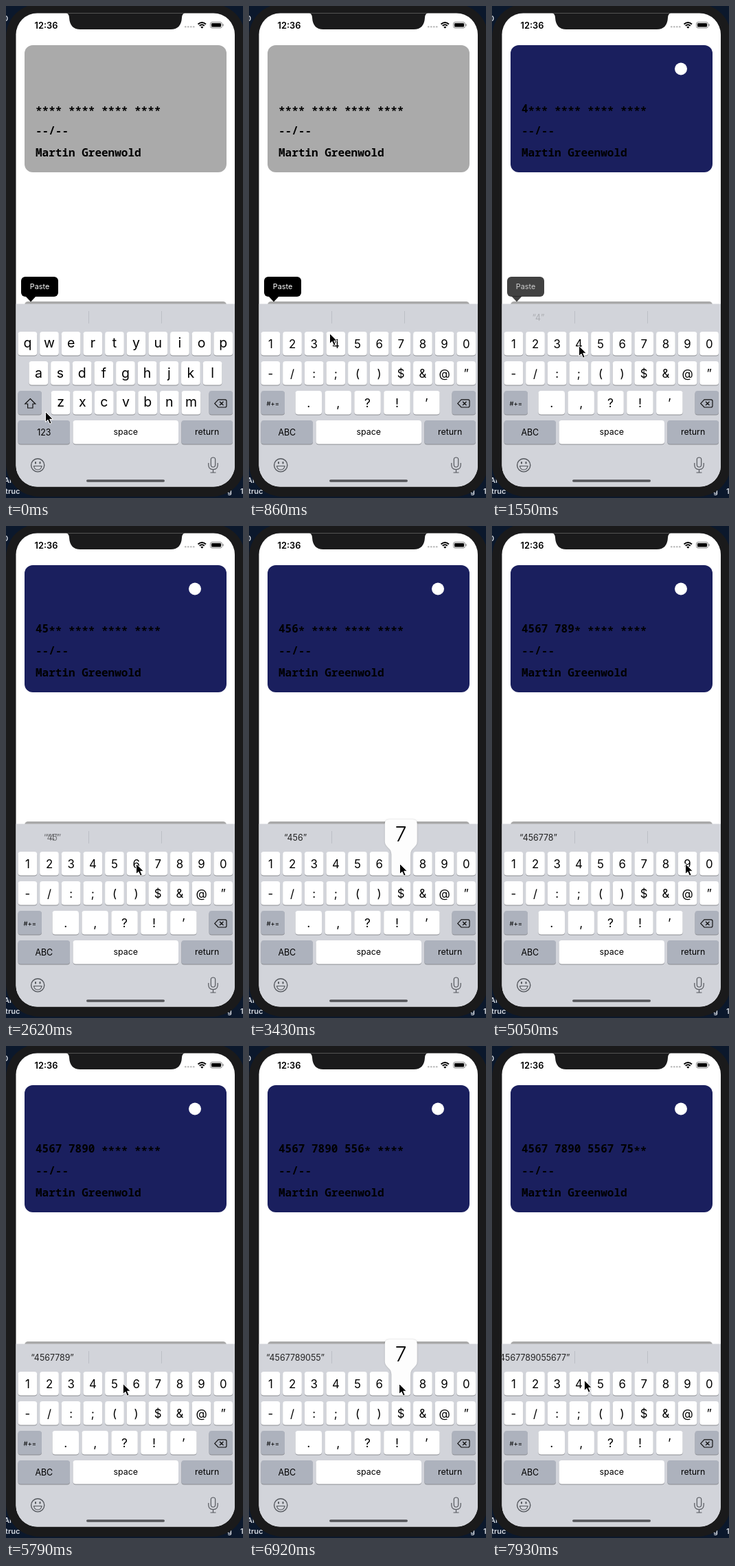
An HTML page with a canvas that plays this animation: 345 px wide and 716 px high, repeating every 7990 ms.

```html
<!DOCTYPE html>
<html lang="en">
<head>
<meta charset="utf-8">
<style>
html, body { margin: 0; width: 100%; height: 100%; overflow: hidden; background: #0b182c; }
canvas { display: block; width: 345px; height: 716px; }
</style>
</head>
<body>
<canvas></canvas>
<script>
const LOOP = 7990;
const SANS = 'Inter, Roboto, sans-serif';
const MONO = '"Noto Sans Mono", "DejaVu Sans Mono", monospace';
const canvas = document.querySelector('canvas');
const c = canvas.getContext('2d');
const dpr = window.devicePixelRatio || 1;
canvas.width = 345 * dpr;
canvas.height = 716 * dpr;

// digit, press time, release time, time its suggestion appears
const TAPS = [
  ['4', 1380, 1550, 1530], ['5', 2200, 2380, 2570], ['6', 2740, 2900, 3080],
  ['7', 3320, 3500, 3890], ['7', 3720, 3900, 4240], ['8', 4360, 4520, 4720],
  ['9', 4880, 5040, 5520], ['0', 5490, 5640, 5980], ['5', 5930, 6050, 6320],
  ['5', 6200, 6340, 6560], ['6', 6600, 6720, 7150], ['7', 6880, 7030, 7390],
  ['7', 7210, 7340, 7640], ['5', 7620, 7760, 9000]
];
// pointer path: time, x, y
const PATH = [
  [0, 57, 590], [150, 57, 590], [330, 58, 612], [460, 58, 612], [860, 117, 476],
  [970, 117, 476], [1140, 126, 494], [1580, 126, 494], [1960, 157, 492],
  [2400, 157, 492], [2560, 189, 491], [2920, 189, 491], [3200, 219, 491],
  [4040, 219, 491], [4170, 238, 491], [4300, 250, 491], [4540, 250, 491],
  [4760, 281, 491], [5060, 281, 491], [5400, 311, 491], [5640, 311, 491],
  [5790, 170, 491], [5870, 158, 491], [6380, 158, 491], [6540, 188, 491],
  [6720, 188, 491], [6860, 218, 491], [7350, 218, 491], [7560, 157, 491],
  [7780, 157, 491], [7930, 134, 486], [7990, 129, 486]
];

const clamp = v => Math.max(0, Math.min(1, v));

function box(x, y, w, h, r, fill) {
  c.beginPath();
  c.roundRect(x, y, w, h, r);
  c.fillStyle = fill;
  c.fill();
}

function text(s, x, y, size, { color = '#000', weight = 400, align = 'center', font = SANS } = {}) {
  c.font = `${weight} ${size}px ${font}`;
  c.textAlign = align;
  c.fillStyle = color;
  c.fillText(s, x, y);
}

function shape(d, fill, stroke, width = 1.2) {
  const p = new Path2D(d);
  if (fill) { c.fillStyle = fill; c.fill(p); }
  if (stroke) { c.strokeStyle = stroke; c.lineWidth = width; c.stroke(p); }
}

function key(x, y, w, label, size, fill = '#fff', dy = 24) {
  box(x, y + 1, w, 34.5, 4, '#8b8d92');
  box(x, y, w, 34.5, 4, fill);
  text(label, x + w / 2, y + dy, size);
}

function row(labels, x, y, pitch, w, size, dy) {
  [...labels].forEach((s, i) => key(x + i * pitch, y, w, s, size, '#fff', dy));
}

function phone() {
  c.fillStyle = '#0b182c';
  c.fillRect(0, 0, 345, 716);
  const style = { color: '#d5d9e0', weight: 600, align: 'left' };
  text('0', -4, 22, 11, style);
  text('Ai', -3, 694, 11, style);
  text('truc', -1, 710, 11, style);
  text('g', 322, 710, 11, style);
  text('1', 341, 710, 11, style);
  box(0, -3, 348, 717, 48, '#1a1a1b');
}

function statusBar() {
  shape('M84 9 Q92 10 92 17 Q93 34 108 34 H240 Q255 34 256 17 Q256 10 264 9 Z', '#1a1a1b');
  text('12:36', 58.5, 32.5, 12.8, { weight: 600 });
  for (let i = 0; i < 4; i++) box(260 + i * 4, 29, 2.5, 2.5, 1.2, '#bbb');
  shape('M279.5 26.5 Q285.3 21.5 291 26.5 M281.7 28.8 Q285.3 25.8 288.8 28.8', null, '#000', 1.9);
  shape('M283.2 30.6 Q285.3 28.9 287.4 30.6 L285.3 32.7 Z', '#000');
  c.beginPath();
  c.roundRect(297.5, 23.5, 17, 8.5, 2.5);
  c.strokeStyle = '#888';
  c.lineWidth = 1;
  c.stroke();
  box(299, 25, 14, 5.5, 1.3, '#000');
  box(315.5, 26, 1.3, 3.5, 1, '#888');
}

function mono(s, y) {
  [...s].forEach((ch, i) => {
    text(ch, 43 + i * 9.6, y + (ch === '*' ? 3 : 0), 16, { weight: 800, align: 'left', font: MONO });
  });
}

function card(digits, blue) {
  box(27, 57, 294, 185, 12, blue ? '#1a1f5e' : '#aaa');
  if (blue) {
    c.beginPath();
    c.arc(275, 91.5, 9, 0, 7);
    c.fillStyle = '#fff';
    c.fill();
  }
  mono(digits.padEnd(16, '*').replace(/.{4}(?=.)/g, '$& '), 155);
  mono('--/--', 187);
  mono('Martin Greenwold', 219);
}

function pasteMenu(t) {
  c.globalAlpha = 1 - clamp((t - 1480) / 280);
  box(22, 394, 54, 29, 6, '#000');
  shape('M28.5 422.5 L36 430.5 L43.5 422.5 Z', '#000');
  text('Paste', 49, 412.3, 10.8, { color: '#fff' });
  c.globalAlpha = 1;
}

function suggestion(s, alpha) {
  if (!s || !alpha) return;
  const label = `“${s}”`;
  c.globalAlpha = alpha;
  c.font = `400 12.4px ${SANS}`;
  const w = c.measureText(label).width;
  text(label, Math.min(67.5 + w / 2, 113.5), 458, 12.4, { color: '#222', align: 'right' });
  c.globalAlpha = 1;
}

function suggestions(t) {
  const n = TAPS.filter(tap => t >= tap[3]).length;
  if (!n) return;
  const all = TAPS.map(tap => tap[0]).join('');
  const fade = clamp((t - TAPS[n - 1][3]) / 100);
  suggestion(all.slice(0, n - 1), 1 - fade);
  suggestion(all.slice(0, n), fade);
}

function keyboard(t) {
  const numeric = t >= 460, grey = '#adb2bd';
  c.fillStyle = '#d2d4da';
  c.fillRect(14, 433.5, 320, 267);
  c.fillStyle = '#bcbfc6';
  c.fillRect(120, 444, 1, 18);
  c.fillRect(226, 444, 1, 18);
  suggestions(t);

  if (numeric) {
    row('1234567890', 17.5, 474, 31.65, 27.7, 16.8, 24);
    row('-/:;()$&@”', 17.5, 517, 31.65, 27.7, 16.8, 23.5);
    row('.,?!’', 67.5, 560, 42.9, 38.5, 17.5, 24);
    key(17.5, 560, 34.5, '#+=', 9.5, grey, 22);
  } else {
    row('qwertyuiop', 17.5, 474, 31.65, 27.7, 19.5, 23);
    row('asdfghjkl', 33.5, 517, 31.65, 27.7, 19.5, 23.5);
    row('zxcvbnm', 65.7, 560, 31.65, 27.7, 19.5, 23);
    key(17.5, 560, 34.5, '', 10, grey);
    shape('M35.3 571.5 L42.8 579 H39 V585 H31.6 V579 H27.8 Z', null, '#111');
  }
  key(295.5, 560, 34.5, '', 10, grey);
  shape('M309 572.8 H319 Q321 572.8 321 575 V581.8 Q321 584 319 584 H309 L303.8 578.4 Z M311 575.8 L316.5 581 M316.5 575.8 L311 581', null, '#111');
  const pressed = t >= 330 && t < 460;
  key(17.5, 603, 75.5, numeric ? 'ABC' : '123', 12.4, pressed ? '#fff' : grey, 22.2);
  key(97.5, 603, 153.5, 'space', 12.4, '#fff', 21);
  key(255.3, 603, 74.7, 'return', 12.4, grey, 21);

  const ink = '#55585e';
  shape('M55.8 668.3 A9.6 9.6 0 1 1 36.6 668.3 A9.6 9.6 0 1 1 55.8 668.3', null, ink, 1.4);
  shape('M40.5 669.5 H52 Q51 675 46.2 675 Q41.5 675 40.5 669.5 Z', null, ink);
  box(42, 663, 2, 3.5, 1, ink);
  box(48.5, 663, 2, 3.5, 1, ink);
  shape('M298.3 660 Q298.3 657 301.5 657 Q304.7 657 304.7 660 V667.5 Q304.7 671 301.5 671 Q298.3 671 298.3 667.5 Z M294.8 665 V668 Q295 674.5 301.5 674.5 Q308 674.5 308.2 668 V665 M301.5 674.5 V679 M297.5 679 H305.5', null, ink);
  box(117, 689.2, 114, 3.6, 1.8, '#55565a');
}

function popup(t) {
  const tap = TAPS.find(([, down, up]) => t >= down && t < up);
  if (!tap) return;
  const mid = 31.35 + (+tap[0] + 9) % 10 * 31.65;
  const l = Math.min(mid - 23.5, 285), r = l + 47, kl = mid - 13.85, kr = mid + 13.85;
  c.shadowColor = 'rgba(0,0,0,.25)';
  c.shadowBlur = 2 * dpr;
  shape(`M${l + 6} 427 H${r - 6} Q${r} 427 ${r} 433 V459
    C${r} 468 ${kr} 468 ${kr} 478 V504.5 Q${kr} 508.5 ${kr - 4} 508.5
    H${kl + 4} Q${kl} 508.5 ${kl} 504.5 V478
    C${kl} 468 ${l} 468 ${l} 459 V433 Q${l} 427 ${l + 6} 427 Z`, '#fdfdfd');
  c.shadowColor = 'transparent';
  text(tap[0], (l + r) / 2, 458.5, 30, { weight: 300 });
}

function pointer(t) {
  const i = Math.max(1, PATH.findIndex(p => p[0] >= t));
  const [t0, x0, y0] = PATH[i - 1], [t1, x1, y1] = PATH[i];
  const k = clamp((t - t0) / (t1 - t0));
  c.save();
  c.translate(x0 + (x1 - x0) * k, y0 + (y1 - y0) * k);
  c.lineJoin = 'round';
  shape('M0.5 0.5 V15.5 L4 12.3 L6.6 18.2 L9.2 17 L6.7 11.3 H11.3 Z', '#000', '#fff', 1);
  c.restore();
}

function draw(now) {
  const t = now % LOOP;
  c.setTransform(dpr, 0, 0, dpr, 0, 0);
  phone();
  c.save();
  c.beginPath();
  c.roundRect(14.5, 10.5, 318.5, 689, 31);
  c.clip();
  c.fillStyle = '#fff';
  c.fillRect(14, 10, 320, 690);
  statusBar();
  card(TAPS.filter(tap => t >= tap[2]).map(tap => tap[0]).join(''), t >= 1550);
  box(27, 430, 294, 30, 5, '#a9a9a9');
  keyboard(t);
  pasteMenu(t);
  popup(t);
  c.restore();
  pointer(t);
  requestAnimationFrame(() => draw(performance.now()));
}
draw(performance.now());
</script>
</body>
</html>
```
